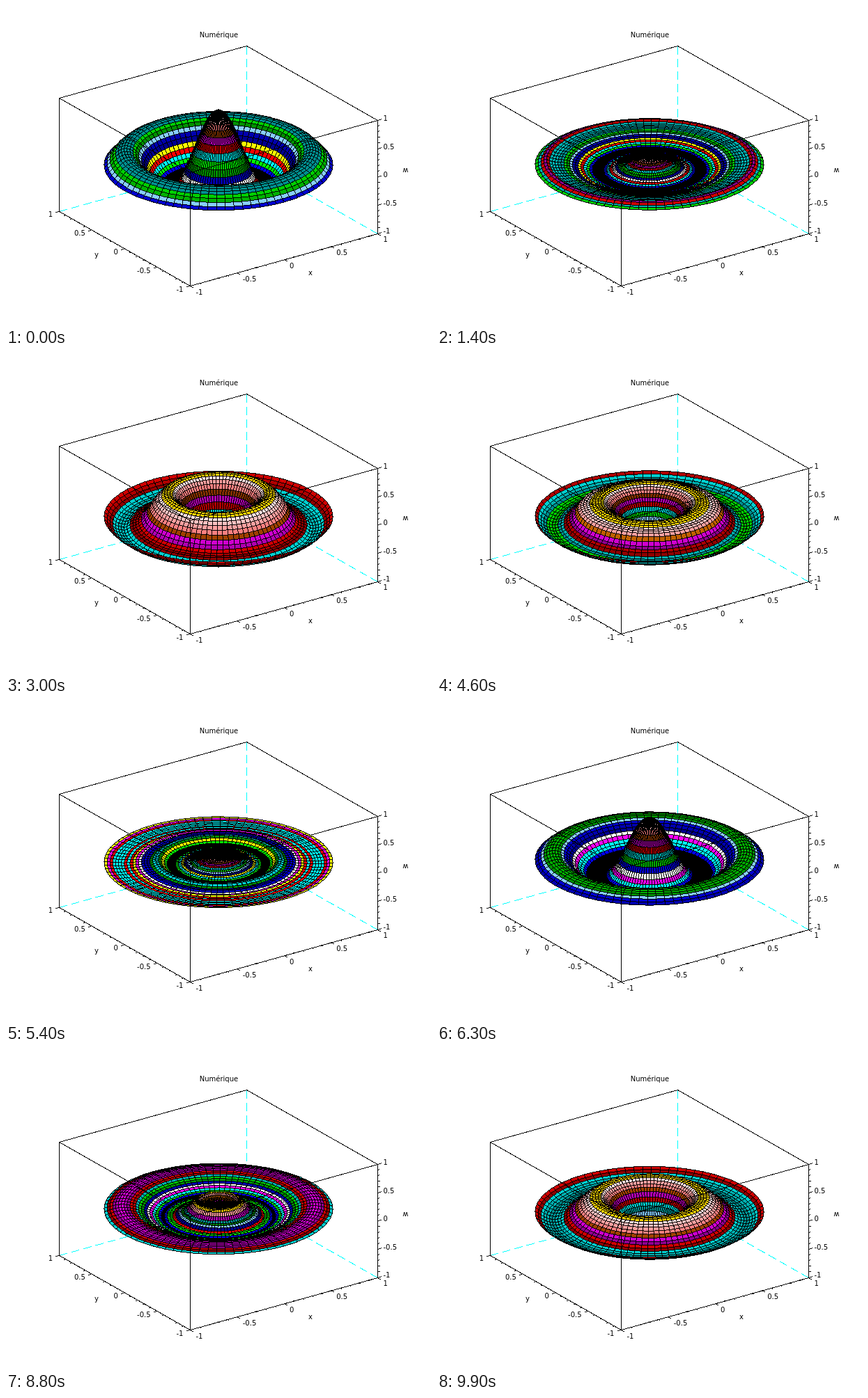
Animation, 610 px wide and 460 px high, one loop 10000 ms. Source, as an HTML page with a canvas:

```html
<!DOCTYPE html>
<html lang="fr">
<head>
<meta charset="utf-8">
<title>Numérique</title>
<style>
  html, body { margin: 0; width: 100%; height: 100%; overflow: hidden; background: #fff; }
  svg, canvas { position: absolute; left: 0; top: 0; width: 610px; height: 460px; }
  line { stroke: #000; stroke-width: 1; shape-rendering: crispEdges; }
  text { font: 10px "DejaVu Sans", Verdana, sans-serif; text-anchor: middle; fill: #000; }
</style>
</head>
<body>
<svg id="back" viewBox="0 0 610 460"></svg>
<canvas id="plot" width="610" height="460"></canvas>
<svg id="front" viewBox="0 0 610 460"></svg>
<script>
const W = 610, H = 460;
const FRAMES = 100, FRAME_MS = 100, LEAD = 2;
const RINGS = 40, SECTORS = 80;
const COURANT = 0.4, K3 = 8.6537, LIFT = 81.3;

const PALETTE = ('000000 0000ff 00ff00 00ffff ff0000 ff00ff ffff00 ffffff ' +
  '000090 0000b0 0000d0 87ceff 009000 00b000 00d000 009090 00b0b0 00d0d0 ' +
  '900000 b00000 d00000 900090 b000b0 d000d0 803000 a04000 c06000 ' +
  'ff8080 ffa0a0 ffc0c0 ffe0e0 ffd700').split(' ').map(hex => {
    const v = parseInt(hex, 16);
    return (0xff000000 | (v & 255) << 16 | (v & 0xff00) | v >> 16) >>> 0;
  });
const BLACK = PALETTE[0];

const project = (x, y, z) => [
  305 + 134.45 * x - 94.05 * y,
  229.75 - 37.5 * x - 53.5 * y - LIFT * z
];

// ---- Axes box ----
const back = document.getElementById('back');
const front = document.getElementById('front');

function add(parent, tag, attrs, text) {
  const el = document.createElementNS('http://www.w3.org/2000/svg', tag);
  for (const k in attrs) el.setAttribute(k, attrs[k]);
  if (text) el.textContent = text;
  parent.appendChild(el);
}
const snap = v => Math.floor(v) + 0.5;

function segment(parent, p, q, attrs = {}) {
  add(parent, 'line', { x1: snap(p[0]), y1: snap(p[1]), x2: snap(q[0]), y2: snap(q[1]), ...attrs });
}
function edge(parent, a, b, attrs) {
  segment(parent, project(...a), project(...b), attrs);
}
function label(text, x, y, anchor = 'middle') {
  add(back, 'text', { x, y: y + 4, style: 'text-anchor:' + anchor }, text);
}

const hidden = { style: 'stroke:#0ff', 'stroke-dasharray': '12 6' };
edge(back, [-1, 1, -1], [1, 1, -1], hidden);
edge(back, [1, -1, -1], [1, 1, -1], hidden);
edge(back, [1, 1, 1], [1, 1, -1], hidden);
edge(back, [-1, 1, 1], [1, 1, 1]);
edge(back, [1, 1, 1], [1, -1, 1]);
edge(back, [-1, 1, -1], [-1, 1, 1]);
edge(back, [1, -1, -1], [1, -1, 1]);
edge(back, [-1, -1, -1], [1, -1, -1]);
edge(back, [-1, -1, -1], [-1, 1, -1]);
edge(front, [-1, -1, -1], [-1, -1, 1]);
edge(front, [-1, 1, 1], [-1, -1, 1]);
edge(front, [-1, -1, 1], [1, -1, 1]);

const axes = [
  { at: v => project(v, -1, -1), dir: [5, 3], from: [272.5, 411], to: [541.5, 335], anchor: 'start' },
  { at: v => project(-1, v, -1), dir: [-5, 1.5], from: [254.5, 407], to: [67, 299], anchor: 'end' },
  { at: v => project(1, -1, v), dir: [6, -1.5], from: [541.5, 323], to: [541.5, 161], anchor: 'start' }
];
for (const { at, dir, from, to, anchor } of axes) {
  for (let i = 0; i <= 20; i++) {
    const p = at(i / 10 - 1), major = i % 5 === 0, s = major ? 1 : 0.5;
    segment(back, p, [p[0] + dir[0] * s, p[1] + dir[1] * s]);
    if (!major) continue;
    const f = i / 20;
    label(String(i / 10 - 1), from[0] + (to[0] - from[0]) * f, from[1] + (to[1] - from[1]) * f, anchor);
  }
}
label('Numérique', 305.5, 41);
label('x', 437, 383);
label('y', 130, 357);
add(back, 'text', { transform: 'translate(573.5 233) rotate(180)' }, 'w');

// ---- Radial wave equation ----
function besselJ0(x) {
  let term = 1, sum = 1;
  for (let k = 1; k < 40; k++) {
    term *= -(x * x) / (4 * k * k);
    sum += term;
  }
  return sum;
}

// The zero condition sits one cell beyond the visible rim.
function laplacian(w) {
  return w.map((v, i) => {
    if (i === 0) return 4 * (w[1] - v);
    const next = i < RINGS ? w[i + 1] : 0;
    return next - 2 * v + w[i - 1] + (next - w[i - 1]) / (2 * i);
  });
}

function solve() {
  const c2 = COURANT * COURANT;
  let prev = Array.from({ length: RINGS + 1 }, (_, i) => besselJ0(K3 * i / RINGS));
  const lap0 = laplacian(prev);
  let now = prev.map((v, i) => v + c2 * lap0[i] / 2);
  const steps = [prev, now];
  while (steps.length < FRAMES + LEAD) {
    const lap = laplacian(now);
    const next = now.map((v, i) => 2 * v - prev[i] + c2 * lap[i]);
    prev = now;
    now = next;
    steps.push(now);
  }
  return steps.slice(LEAD);
}
const profiles = solve();

// ---- Surface mesh, ordered back to front ----
const ground = [];
for (let i = 0; i <= RINGS; i++) {
  for (let j = 0; j < SECTORS; j++) {
    const a = 2 * Math.PI * j / SECTORS, r = i / RINGS;
    ground.push(project(r * Math.cos(a), r * Math.sin(a), 0));
  }
}
const cells = [];
for (let i = 0; i < RINGS; i++) {
  for (let j = 0; j < SECTORS; j++) {
    const a = i * SECTORS, b = a + SECTORS, n = (j + 1) % SECTORS;
    const ids = [a + j, b + j, b + n, a + n];
    cells.push({ i, ids, depth: ids.reduce((s, id) => s + ground[id][1], 0) });
  }
}
cells.sort((p, q) => p.depth - q.depth);

// ---- Hard-edged drawing ----
const ctx = document.getElementById('plot').getContext('2d');
const image = ctx.createImageData(W, H);
const pixels = new Uint32Array(image.data.buffer);

function triangle(a, b, c, color) {
  const pts = [a, b, c];
  const y0 = Math.ceil(Math.min(a[1], b[1], c[1]) - 0.5);
  const y1 = Math.floor(Math.max(a[1], b[1], c[1]) - 0.5);
  for (let y = y0; y <= y1; y++) {
    const yc = y + 0.5;
    let lo = Infinity, hi = -Infinity;
    for (let k = 0; k < 3; k++) {
      const p = pts[k], q = pts[(k + 1) % 3];
      if (p[1] === q[1] || (p[1] - yc) * (q[1] - yc) > 0) continue;
      const x = p[0] + (q[0] - p[0]) * (yc - p[1]) / (q[1] - p[1]);
      lo = Math.min(lo, x);
      hi = Math.max(hi, x);
    }
    for (let x = Math.ceil(lo - 0.5); x + 0.5 <= hi; x++) pixels[y * W + x] = color;
  }
}

function stroke(p, q) {
  const dx = q[0] - p[0], dy = q[1] - p[1];
  const n = Math.max(1, Math.ceil(Math.max(Math.abs(dx), Math.abs(dy))));
  for (let k = 0; k <= n; k++) {
    const x = Math.floor(p[0] + dx * k / n), y = Math.floor(p[1] + dy * k / n);
    pixels[y * W + x] = BLACK;
  }
}

function draw(w) {
  const min = Math.min(...w), span = Math.max(...w) - min;
  const pts = ground.map(([x, y], id) => [x, y - LIFT * w[Math.floor(id / SECTORS)]]);
  // Each cell takes the level of its inner ring.
  const colors = w.map(v => PALETTE[Math.min(31, Math.floor((v - min) / span * 32))]);
  pixels.fill(0);
  for (const { i, ids } of cells) {
    const [a, b, c, d] = ids.map(id => pts[id]);
    triangle(a, b, c, colors[i]);
    triangle(a, c, d, colors[i]);
    stroke(a, b);
    stroke(b, c);
    stroke(c, d);
    stroke(d, a);
  }
  ctx.putImageData(image, 0, 0);
}

let shown = -1;
const start = performance.now();
function tick() {
  const n = Math.floor((performance.now() - start) / FRAME_MS) % FRAMES;
  if (n !== shown) {
    shown = n;
    draw(profiles[n]);
  }
  requestAnimationFrame(tick);
}
tick();
</script>
</body>
</html>
```
